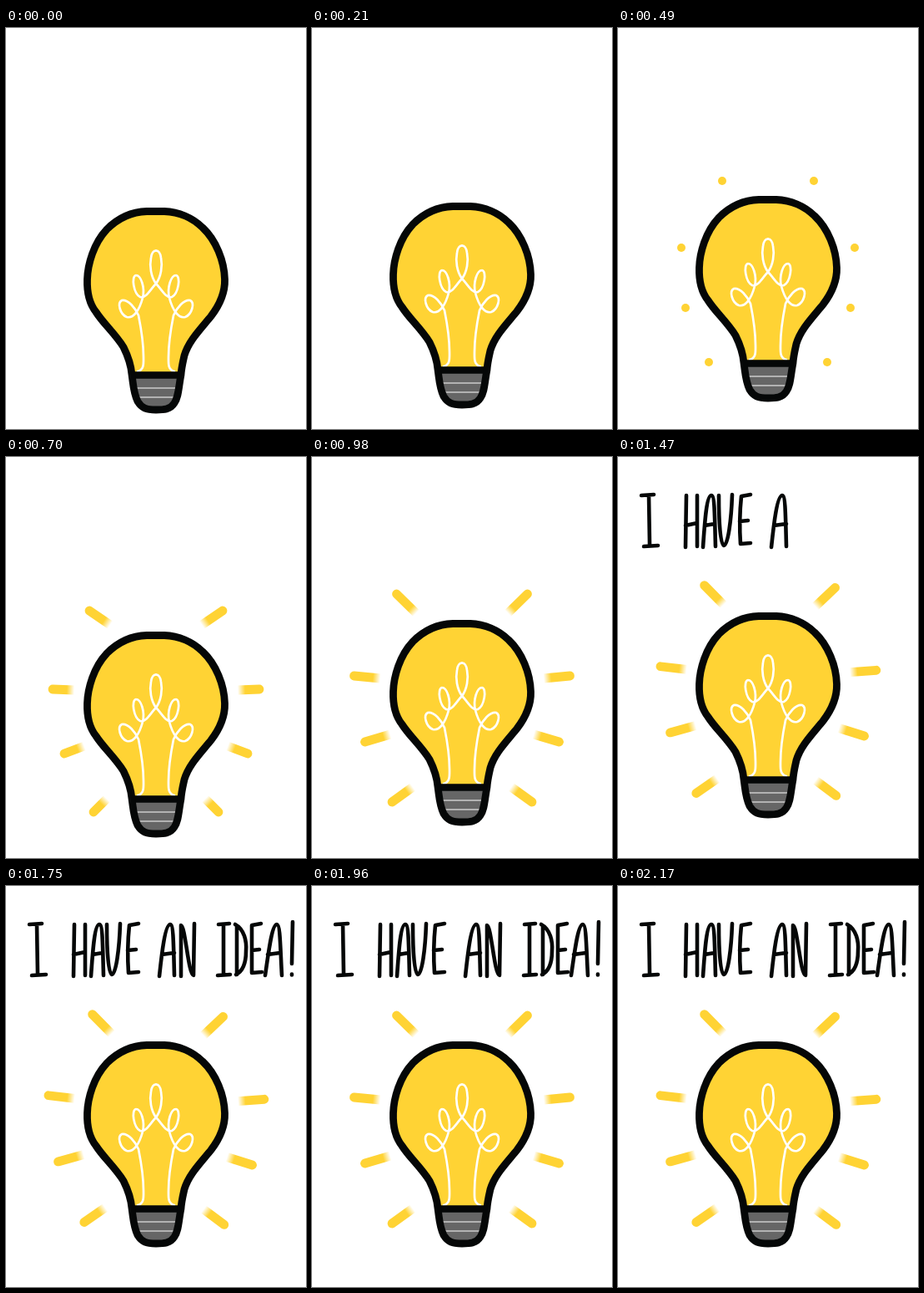
These frames come from a looping animation (360 px wide and 480 px high, 2.24 s). An HTML page with a canvas:

```html
<!DOCTYPE html>
<html lang="en">
<head>
<meta charset="utf-8">
<title>I have an idea!</title>
<style>
html, body { margin: 0; width: 100%; height: 100%; overflow: hidden; background: #fff; }
canvas { display: block; }
</style>
</head>
<body>
<canvas id="stage" width="360" height="480" role="img" aria-label="I HAVE AN IDEA!"></canvas>
<script>
const ctx = document.getElementById('stage').getContext('2d');
const STEP = 70, COUNT = 32;
const YELLOW = '#ffd334', BLACK = '#050707';

const bulb = new Path2D(`M169 218.5 L190 218.5 C207 219 224 226 236 238
  C252 253 262 278 262.5 300 C263 317 256 331 246 344 C232 361 219 374 214 391
  C212 400 210.5 406 210 414 C207 430 207 441 202 448 C197 456 189 456 180 456
  C168 456 163 454 158 446 C153 436 153 428 151 414 C150 402 147 393 141 381
  C131 365 117 353 108 339 C100 329 97 316 97.5 300 C98 282 105 257 121 240
  C134 227 150 219 169 218.5Z`);
// Left half of the filament; the right half is its mirror image
const wire = new Path2D(`M158 410 C166 408 165 400 165 393 C165 375 162 358 159 343
  C155 334 147 324 139 325 C133 328 137 342 145 345 C153 347 160 337 164 322
  C167 310 162 295 156 295 C150 296 153 317 161 321 C168 323 173 312 180 305
  C186 297 188 284 186 274 C185 267 182 265.5 180 265.5`);

const letters = [
  'M28 46 L43 45 M37 46 L38 106 M31 107 L48 106',
  'M82 46 L81 108 M95 46 L95 107 M81 82 L95 79',
  'M102 108 C104 80 106 46 112 46 C116 46 116 70 117 107 M104 82 L116 80',
  'M121 46 C121 80 123 106 127 106 C132 106 136 75 137 45',
  'M159 45 L148 47 Q145 75 147 104 L159 103 M146 77 L156 76',
  'M184 108 C187 80 191 46 197 46 C201 46 201 70 202 107 M187 82 L202 80',
  'M210 108 L210 47 C215 47 219 107 225 107 L226 45',
  'M255 46 L268 45 M261 46 L261 106 M254 107 L269 106',
  'M277 48 L277 106 M275 46 C286 52 289 66 288 78 C288 92 284 102 276 106',
  'M306 45 L295 47 L295 104 L307 103 M295 77 L304 76',
  'M311 107 C315 80 319 46 325 46 C329 46 329 70 331 107 M314 82 L329 80',
  'M344 43 L343 93 M343 105.5 L343 106.5'
].map(d => new Path2D(d));

// Left rays: first dot, half-grown tip, full tip, inner end
const rays = [
  [[125, 196], [100, 189], [101.5, 183], [125, 206]],
  [[76, 276], [56, 283], [50.5, 281], [82, 284]],
  [[81, 348], [70, 360], [63.5, 360], [94, 351]],
  [[109, 413], [105, 430], [96, 432], [121, 414]]
];
const lift = [[0, 1], [7, -13], [10, -5], [14, -19], [16, -24], [18, -28]];

const mix = (a, b, p) => a + (b - a) * p;

function track(keys, i) {
  const n = keys.findIndex(k => k[0] > i);
  if (n < 0) return keys[keys.length - 1][1];
  const [a, b] = [keys[n - 1], keys[n]];
  return mix(a[1], b[1], (i - a[0]) / (b[0] - a[0]));
}

function stroke(path, color, width) {
  ctx.strokeStyle = color;
  ctx.lineWidth = width;
  ctx.stroke(path);
}

function line(x1, y1, x2, y2, color, width) {
  const p = new Path2D();
  p.moveTo(x1, y1);
  p.lineTo(x2, y2);
  stroke(p, color, width);
}

function bothSides(draw) {
  draw();
  ctx.save();
  ctx.transform(-1, 0, 0, 1, 360, 0);
  draw();
  ctx.restore();
}

function drawRay([dot, half, full, end], i) {
  if (i <= 7) {
    ctx.fillStyle = YELLOW;
    ctx.beginPath();
    ctx.arc(...dot, i < 7 ? 3 : 5, 0, 7);
    ctx.fill();
    return;
  }
  const [x, y] = [0, 1].map(k =>
    track([[7, dot[k]], [10, half[k]], [12, full[k]]], i));
  const length = Math.hypot(end[0] - x, end[1] - y);
  const fade = ctx.createLinearGradient(x, y, ...end);
  fade.addColorStop(0, YELLOW);
  fade.addColorStop(Math.max(0, 1 - 9 / length), YELLOW);
  fade.addColorStop(1, YELLOW + '00');
  line(x, y, ...end, fade, 10.8);
}

function drawBulb() {
  ctx.fillStyle = YELLOW;
  ctx.fill(bulb);
  ctx.save();
  ctx.clip(bulb);
  ctx.fillStyle = '#666';
  ctx.fillRect(140, 415, 80, 45);
  line(150, 430, 212, 430, '#ccc', 1.6);
  line(150, 441, 212, 441, '#ccc', 1.6);
  ctx.restore();
  bothSides(() => stroke(wire, '#fff', 2.7));
  line(152, 414.5, 209, 414.5, BLACK, 8.5);
  stroke(bulb, BLACK, 8.8);
}

function draw(i) {
  ctx.fillStyle = '#fff';
  ctx.fillRect(0, 0, 360, 480);
  ctx.lineCap = ctx.lineJoin = 'round';

  ctx.save();
  ctx.translate(0, track(lift, i));
  if (i >= 6) {
    ctx.save();
    if (i >= 18 && i % 2) {
      ctx.translate(180, 304);
      ctx.rotate(Math.PI / 180);
      ctx.translate(-180, -304);
    }
    bothSides(() => rays.forEach(r => drawRay(r, i)));
    ctx.restore();
  }
  drawBulb();
  ctx.restore();

  const shown = Math.max(0, (i - 18) * 2);
  letters.slice(0, shown).forEach(p => stroke(p, BLACK, 4.6));
}

function tick() {
  draw(Math.floor(performance.now() / STEP) % COUNT);
  requestAnimationFrame(tick);
}
tick();
</script>
</body>
</html>
```
